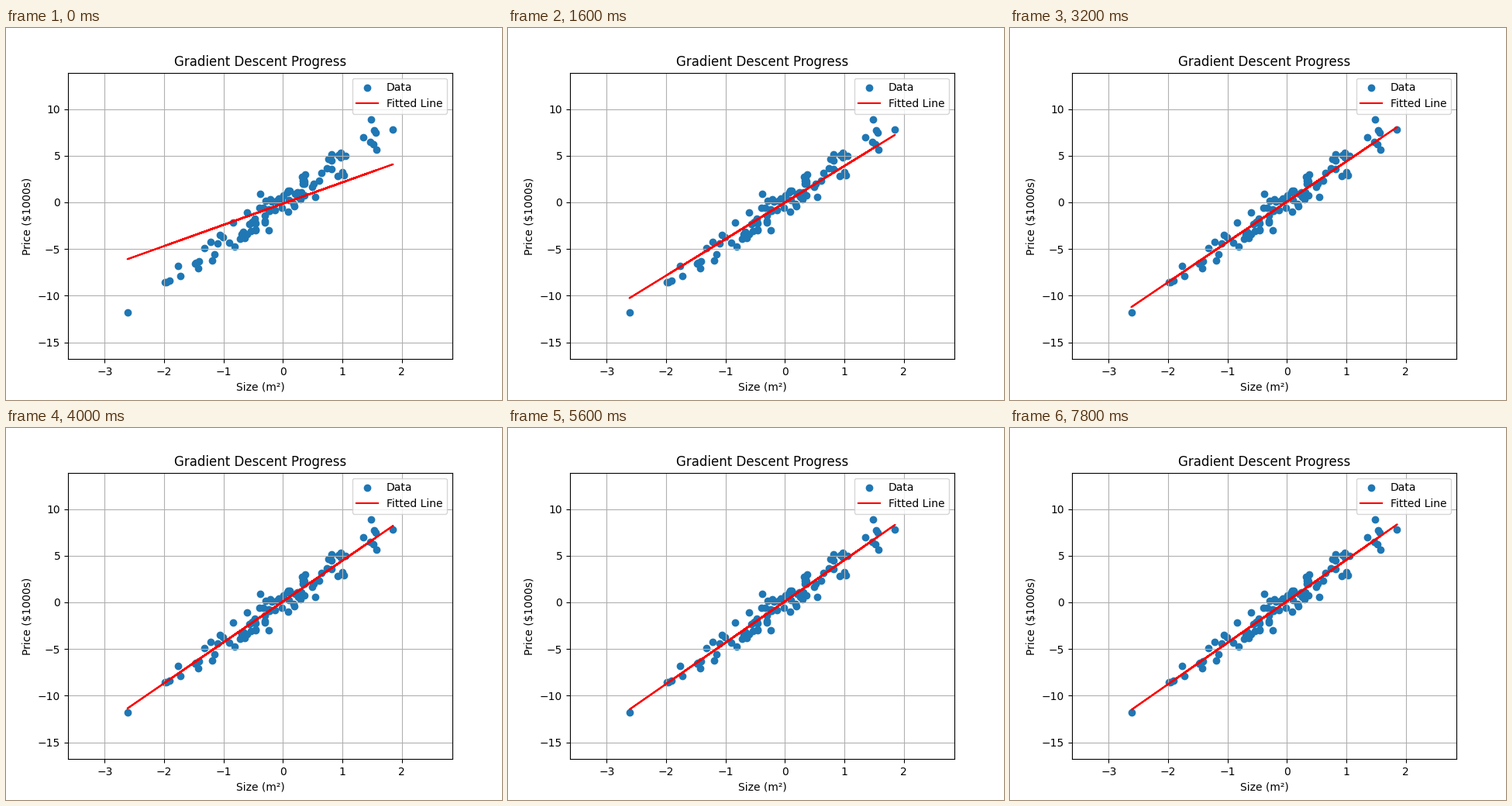
Animation, 640 px wide and 480 px high, one loop 8 s. Source, as a matplotlib script:

```python
import numpy as np
import matplotlib.pyplot as plt
from matplotlib.animation import FuncAnimation

N = 100
FRAMES = 40
INTERVAL = 200
RATE = 0.1
WARMUP = 4  # descent steps taken before the first frame


def make_data(seed=42):
    """Noisy linear data in shuffled order."""
    rng = np.random.RandomState(seed)
    x = rng.standard_normal(N)
    slope = 100 * rng.uniform()
    y = slope * x + rng.normal(scale=10, size=N)
    order = np.arange(N)
    rng.shuffle(order)
    return x[order], y[order] / 10


def descend(x, y, steps):
    """Slope and intercept after each gradient step, starting from zero."""
    w = b = 0.0
    path = [(w, b)]
    for _ in range(steps):
        err = w * x + b - y
        w -= RATE * 2 * np.mean(err * x)
        b -= RATE * 2 * np.mean(err)
        path.append((w, b))
    return path


x, y = make_data()
path = descend(x, y, WARMUP + FRAMES)

fig, ax = plt.subplots(figsize=(6.4, 4.8), dpi=100)
ax.scatter(x, y, label="Data")
line, = ax.plot([], [], color="red", label="Fitted Line")
ax.set_xlim(x.min() - 1, x.max() + 1)
ax.set_ylim(y.min() - 5, y.max() + 5)
ax.set_title("Gradient Descent Progress")
ax.set_xlabel("Size (m²)")
ax.set_ylabel("Price ($1000s)")
ax.legend(loc="upper right")
ax.grid(True)


def update(i):
    w, b = path[WARMUP + i]
    line.set_data(x, w * x + b)
    return line,


anim = FuncAnimation(fig, update, frames=FRAMES, interval=INTERVAL,
                     init_func=lambda: update(0), repeat=True, repeat_delay=0)
plt.show()
```
